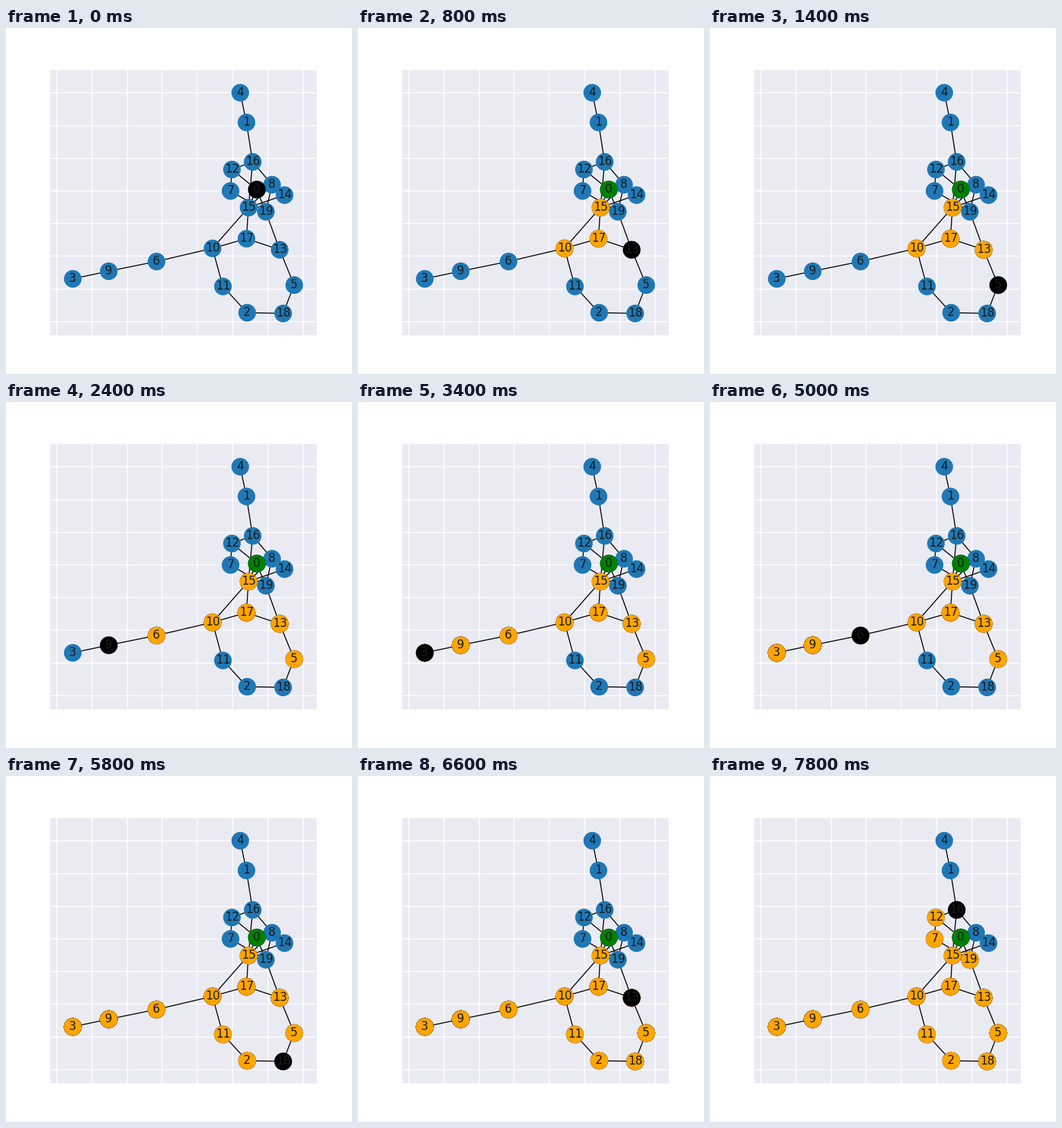
Write a matplotlib script that moves like this. It is 500x500 px and loops after 8 s.

```python
from itertools import pairwise

import matplotlib.pyplot as plt
import numpy as np
from matplotlib.animation import FuncAnimation
from matplotlib.collections import LineCollection

plt.rcParams["font.family"] = "DejaVu Sans"

# Node centres in pixels, indexed by node number
POS = np.array([
    (361.7, 233), (347, 136), (348, 411), (96, 362), (338, 93),
    (416, 371), (217, 337), (324, 235), (384, 226), (148, 351),
    (298, 318), (313, 373), (326, 204), (395, 320), (402, 241),
    (350, 259), (356, 193), (347, 304), (400, 412), (375, 265),
]) + 0.4

# Each trail links its nodes one after another
TRAILS = ["4 1 16 12 7 19 8 15 14",
          "3 9 6 10 11 2 18 5 13 19 0 15 16 8",
          "13 17 10 15 17", "12 0"]
EDGES = [e for t in TRAILS for e in pairwise(map(int, t.split()))]

# The walker takes the shortest way from stop to stop
STOPS = [0, 10, 13, 17, 5] + [3, 9] * 6 + [2, 5, 18, 13, 7, 19, 0, 12, 16]


def neighbours(n):
    return [b if a == n else a for a, b in EDGES if n in (a, b)]


def shortest(start, goal):
    queue = [[start]]
    for path in queue:
        if path[-1] == goal:
            return path
        queue += [path + [n] for n in neighbours(path[-1]) if n not in path]


WALK = STOPS[:1]
for a, b in pairwise(STOPS):
    WALK += shortest(a, b)[1:]

fig = plt.figure(figsize=(5, 5), dpi=100, facecolor="white")
ax = fig.add_axes([0.125, 0.11, 0.775, 0.77], facecolor="#EAEAF2")
ax.set(xlim=(62.5, 450), ylim=(445, 60), xticks=[], yticks=[])
for spine in ax.spines.values():
    spine.set(color="white", linewidth=1.25)

for k in range(8):
    ax.axvline(72.9 + 50.85 * k, color="white", lw=1, zorder=0.5)
    ax.axhline(93.45 + 47.2 * k, color="white", lw=1, zorder=0.5)

ax.add_collection(LineCollection([POS[list(e)] for e in EDGES],
                                 colors="black", linewidths=1, zorder=1))


def dots(nodes, color):
    return ax.scatter(*POS[nodes].T, s=300, c=color, lw=1, zorder=2)


dots(list(range(len(POS))), "#1f78b4")

# Every step paints a black dot, then its visited colour on leaving
layers = []
for n in WALK:
    layers.append(dots([n], "black"))
    layers.append(dots([n], "green" if n == WALK[0] else "orange"))

for n, (x, y) in enumerate(POS):
    ax.text(x, y, str(n), size=12, color="0.1", ha="center", va="center",
            zorder=3)


def update(i):
    for k, layer in enumerate(layers):
        layer.set_visible(k <= 2 * i)
    return layers


anim = FuncAnimation(fig, update, frames=len(WALK), interval=200,
                     repeat=True, repeat_delay=0, blit=False)
plt.show()
```
